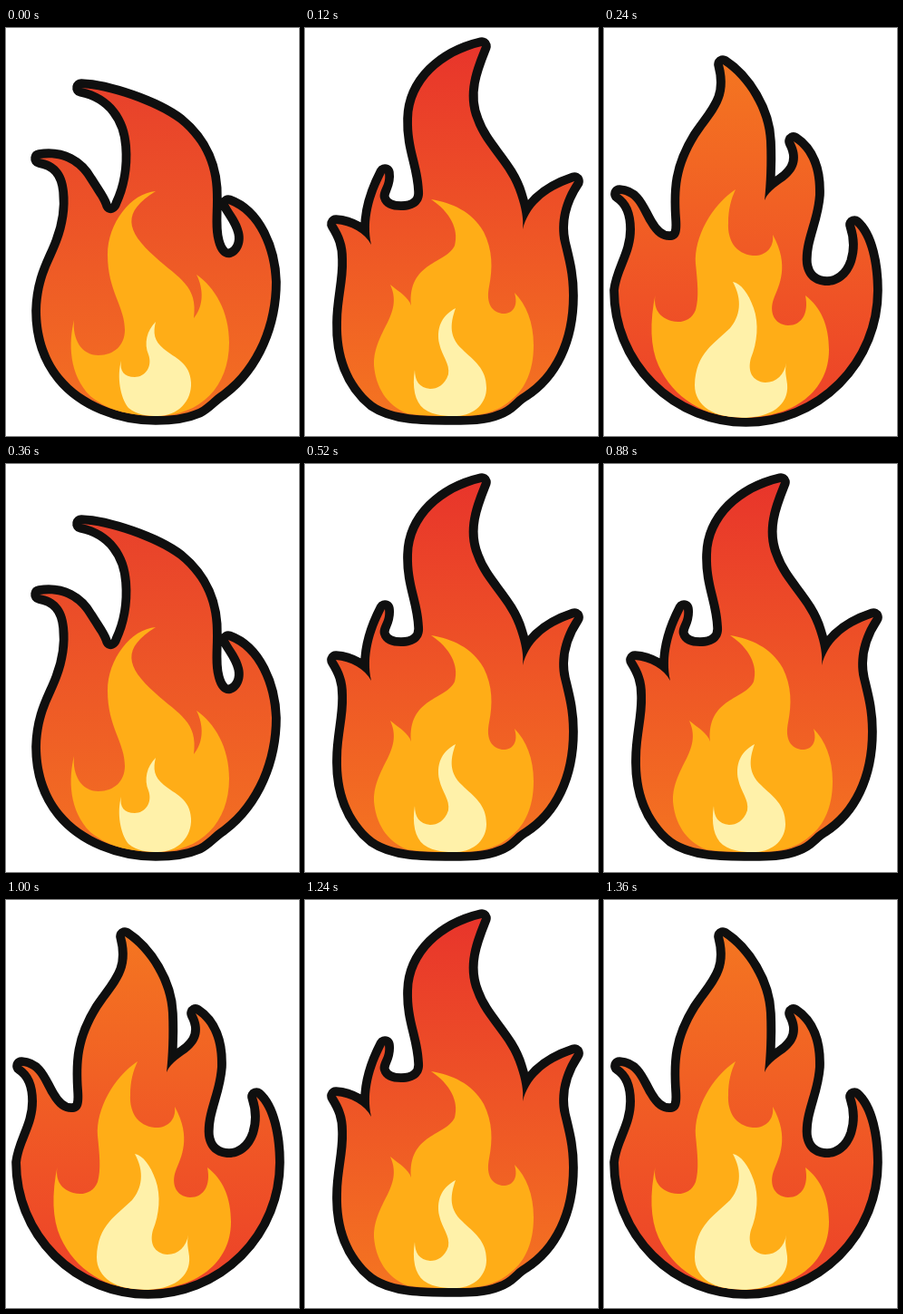
Recreate the animation shown at these times as an HTML page. Size 323 px wide and 450 px high, loop 1520 ms.

```html
<!DOCTYPE html>
<html lang="en">
<head>
<meta charset="utf-8">
<title>Flame</title>
<style>
  html, body { margin: 0; width: 100%; height: 100%; overflow: hidden; background: #fff; }
  svg { display: block; width: 100vw; height: 100vh; }
  .pose { visibility: hidden; }
  .outer { stroke: #0f0f0f; stroke-width: 19.6; stroke-linejoin: round; paint-order: stroke; }
  .mid { fill: #ffad17; }
  .core { fill: #fff1a9; }
</style>
</head>
<body>
<svg id="stage" viewBox="0 0 323 450"></svg>
<script>
const poses = [
  { // leaning left
    top: '#e8412b', bottom: '#f37022', y: [66, 428],
    outer: `M83 66C112 67 165 85 190 104C218 127 229 155 228 190C228 205 226 222 230 236
      C233 248 240 255 248 253C258 250 264 238 261 225C258 212 251 205 245 194
      C276 205 292 245 293 280C293 325 275 372 238 400C228 406 222 415 212 420
      C196 427 180 428 165 428C125 428 85 412 62 384C44 362 38 335 38 312
      C39 275 52 258 60 236C67 218 70 198 68 180C66 158 55 147 37 144
      C62 140 80 151 90 169C98 182 103 188 106 196C109 207 122 207 126 195
      C134 178 139 155 137 130C135 100 118 73 83 66Z`,
    mid: `M165 180C138 182 112 215 112 250C112 290 131 307 131 333C131 350 119 361 102 361
      C83 361 73 343 75 322C69 347 69 382 93 406C115 424 140 428 165 428
      C215 428 246 395 246 347C246 312 230 286 210 272C219 290 217 308 207 320
      C212 284 190 276 165 253C131 223 128 203 165 180Z`,
    core: `M165 324C155 334 152 348 157 360C162 374 153 385 142 385C130 385 125 378 127 367
      C122 384 126 408 135 419C145 427 155 428 167 428C190 428 205 411 204 391
      C203 369 186 364 174 354C163 345 162 336 165 324Z`
  },
  { // tall, leaning right
    top: '#e8352b', bottom: '#f47421', y: [20, 428],
    outer: `M195 20C185 45 174 72 186 102C197 133 224 151 234 184C239 199 241 210 240 222
      C246 198 264 180 297 169C283 190 277 214 282 237C287 258 291 272 291 295
      C291 345 272 382 241 402C230 408 226 418 212 422C198 428 180 428 163 428
      C130 428 98 428 76 413C50 392 39 360 40 325C40 300 47 278 46 255
      C46 239 42 229 34 216C50 217 66 226 73 239C67 212 75 185 88 160
      C90 174 81 178 83 188C86 198 95 201 106 201C122 201 131 193 130 180
      C129 151 117 133 118 100C119 60 152 30 195 20Z`,
    mid: `M139 189C160 203 170 222 165 240C156 260 113 258 117 306C114 297 105 292 94 283
      C109 317 76 333 76 372C78 396 90 416 112 425C130 428 148 428 165 428
      C196 428 212 424 230 408C246 394 252 372 252 350C252 325 244 305 231 292
      C236 309 227 316 217 315C203 312 200 300 203 285C207 265 207 245 197 225
      C184 202 162 193 139 189Z`,
    core: `M166 309C149 318 145 333 148 348C151 362 160 370 158 382C154 394 146 398 138 398
      C126 397 121 389 121 377C118 396 121 412 131 420C143 428 155 428 167 428
      C188 427 200 413 200 397C200 375 186 367 173 354C160 342 159 328 166 309Z`
  },
  { // wide, four tongues
    top: '#f47521', bottom: '#ed4528', y: [40, 400],
    outer: `M131 40C156 56 178 92 179 125C180 150 179 172 177 190C182 178 194 173 203 165
      C217 153 216 138 209 125C226 136 234 157 233 184C231 213 217 234 219 260
      C221 275 231 284 246 284C258 284 271 276 277 258C281 245 281 232 276 217
      C291 230 297 262 297 289.5A140.5 140.5 0 0 1 16 289.5
      C19 266 34 249 34 222C34 203 28 190 17 183C35 184 39 201 48 216
      C56 230 65 235 74 234C84 233 85 224 84 210C82 178 83 154 104 120
      C123 92 141 78 131 40Z`,
    mid: `M145 178C119 195 99 231 101 260C103 280 105 297 101 311C96 323 85 326 74 323
      C58 318 54 306 57 292C50 325 51 352 60 372C76 408 112 430 152 430
      C210 430 248 400 248 355C248 328 239 308 222 295C226 315 218 328 203 328
      C187 327 182 313 187 299C193 284 205 262 186 228C188 243 177 252 164 251
      C145 249 136 234 137 215C137 200 140 189 145 178Z`,
    core: `M142 280C153 300 150 318 139 331C122 348 101 358 100 394C100 417 122 430 152 430
      C184 430 204 416 202 393C201 384 199 379 201 369C199 382 190 391 178 391
      C163 390 158 378 162 364C169 347 171 326 165 309C159 292 151 282 142 280Z`
  }
];

// Hold times in ms; poses repeat in order.
const holds = [120, 120, 120, 160, 120, 120, 120, 120, 120, 120, 120, 160];
const loop = holds.reduce((a, b) => a + b);

const stage = document.getElementById('stage');
stage.innerHTML = poses.map((p, i) => `
  <linearGradient id="g${i}" gradientUnits="userSpaceOnUse" x1="0" x2="0" y1="${p.y[0]}" y2="${p.y[1]}">
    <stop stop-color="${p.top}"/><stop offset="1" stop-color="${p.bottom}"/>
  </linearGradient>
  <clipPath id="c${i}"><path d="${p.outer}"/></clipPath>
  <g class="pose">
    <path class="outer" fill="url(#g${i})" d="${p.outer}"/>
    <g clip-path="url(#c${i})">
      <path class="mid" d="${p.mid}"/>
      <path class="core" d="${p.core}"/>
    </g>
  </g>`).join('');
const groups = stage.querySelectorAll('.pose');

function poseAt(time) {
  let t = time % loop, step = 0;
  while (t >= holds[step]) t -= holds[step++];
  return step % poses.length;
}

function draw(time) {
  const current = poseAt(time);
  groups.forEach((g, i) => { g.style.visibility = i === current ? 'visible' : 'hidden'; });
}

const start = performance.now();
function tick() {
  draw(performance.now() - start);
  requestAnimationFrame(tick);
}
tick();
</script>
</body>
</html>
```
